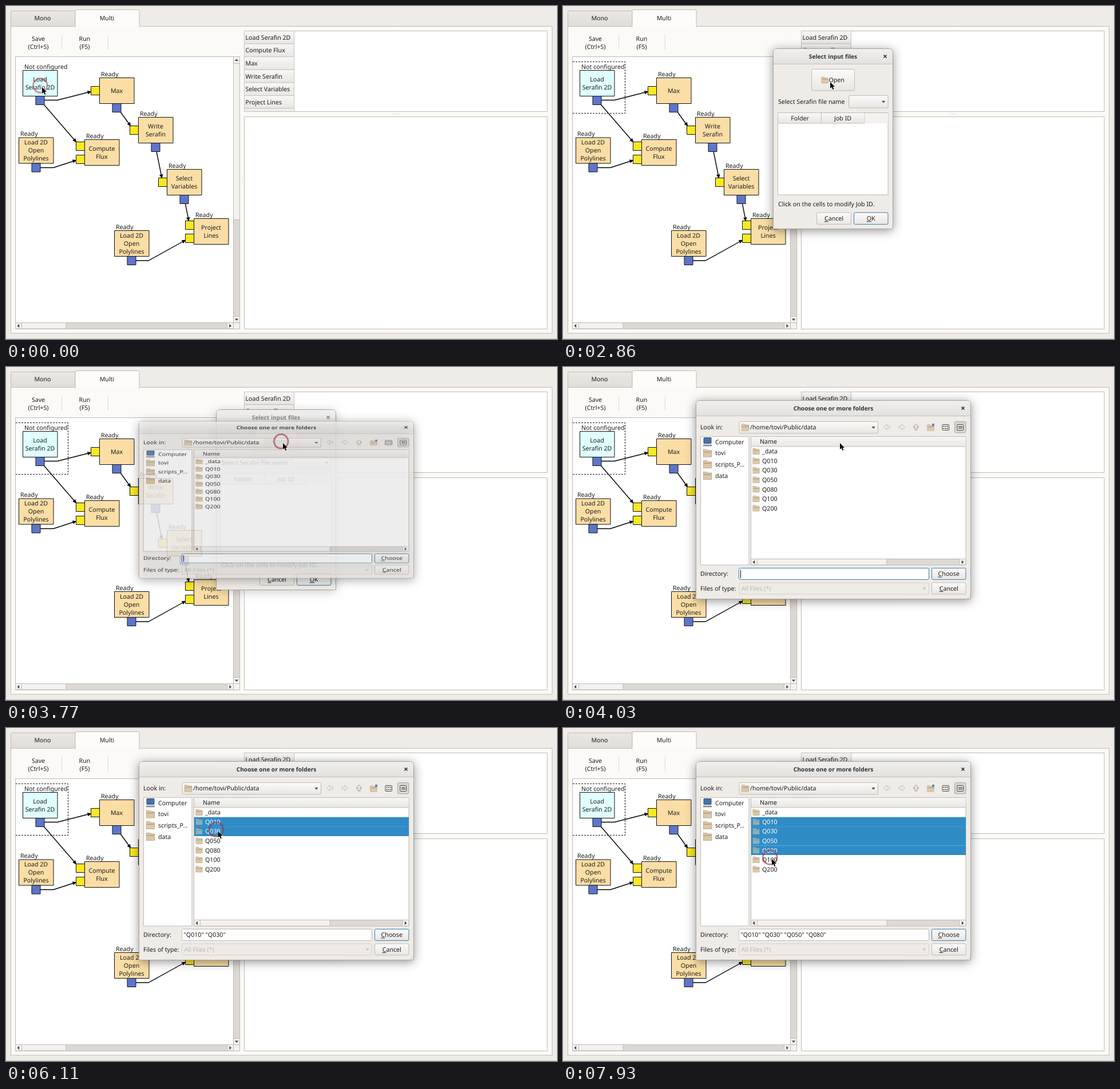
Write an HTML page with a canvas that moves like this. It is 963 px wide and 582 px high and loops after 8000 ms.

```html
<!DOCTYPE html>
<html lang="en">
<head>
<meta charset="utf-8">
<title>Workflow editor</title>
<style>
html, body { margin: 0; width: 100%; height: 100%; overflow: hidden; background: #efebe7; }
canvas { display: block; }
</style>
</head>
<body>
<canvas id="stage" width="963" height="582"></canvas>
<script>
const W = 963, H = 582, LOOP = 8000, STEP = 130;
const INK = '#1c1c1c', EDGE = '#bfbab5', BASE = '#efebe7', BLUE = '#308cc6';
const stage = document.getElementById('stage').getContext('2d');
const layer = Object.assign(document.createElement('canvas'), { width: W, height: H }).getContext('2d');
let c = stage;

// ---- drawing helpers ----
function fade(y, h, top, bottom) {
  const g = c.createLinearGradient(0, y, 0, y + h);
  g.addColorStop(0, top);
  g.addColorStop(1, bottom);
  return g;
}
function box(x, y, w, h, fill, stroke, radius = 0) {
  c.beginPath();
  c.roundRect(x, y, w, h, radius);
  if (fill) { c.fillStyle = fill; c.fill(); }
  if (stroke) { c.strokeStyle = stroke; c.lineWidth = 1; c.stroke(); }
}
function line(points, color = EDGE, width = 1) {
  c.beginPath();
  points.forEach(([x, y]) => c.lineTo(x, y));
  c.strokeStyle = color;
  c.lineWidth = width;
  c.stroke();
}
function shape(d, x, y, fill, stroke, angle = 0, width = 1) {
  const p = new Path2D(d);
  c.save();
  c.translate(x, y);
  c.rotate(angle);
  if (stroke) { c.strokeStyle = stroke; c.lineWidth = width; c.stroke(p); }
  if (fill) { c.fillStyle = fill; c.fill(p); }
  c.restore();
}
// y is the middle of the capitals
function text(s, x, y, align = 'left', color = INK, font = '10.65px') {
  c.font = font + ' "Noto Sans", sans-serif';
  c.textRendering = 'geometricPrecision';
  c.textAlign = align;
  c.fillStyle = color;
  c.fillText(s, x, y + 3.8);
}
const triangle = (x, y, angle = 0, color = '#444') => shape('M-3.2-1.6H3.2L0 2Z', x, y, color, null, angle);
const panel = (x, y, w, h) => box(x, y, w, h, '#fff', EDGE);

function button(label, x, y, w, h, primary) {
  box(x, y, w, h, fade(y, h, '#fcfbfa', '#e9e6e2'), primary ? '#3c7fb1' : EDGE, 2);
  const cx = x + w / 2, cy = y + h / 2;
  text(label, cx, cy, 'center');
  const left = cx - c.measureText(label).width / 2;
  line([[left, cy + 5.5], [left + c.measureText(label[0]).width, cy + 5.5]], INK);
}
function combo(x, y, w, h, off) {
  box(x, y, w, h, off ? '#eeebe7' : fade(y, h, '#fcfbfa', '#e9e6e2'), off ? '#d5d1cc' : EDGE, 2);
  triangle(x + w - 8, y + h / 2, 0, off ? '#c4c0bb' : '#444');
}
function folder(x, y, selected, size = 1) {
  const [fill, edge] = selected ? ['#8db0b8', '#6f9cad'] : ['#dcc8a8', '#ab9676'];
  c.save();
  c.translate(x, y);
  c.scale(size, size);
  shape('M-5.5-5H-1L0-3.5H5.5V5H-5.5Z', 0, 0, fill, edge);
  line([[-5, -1.5], [5, -1.5]], edge);
  c.restore();
}
function hScroll(x, y, w, thumbEnd) {
  box(x, y, w, 10.5, '#f4f2ef', EDGE);
  box(thumbEnd, y + .5, x + w - 11 - thumbEnd, 9.5, '#dcd8d4');
  for (const sx of [x + 11, thumbEnd, x + w - 11]) line([[sx, y], [sx, y + 10]]);
  triangle(x + 5, y + 5.5, Math.PI / 2);
  triangle(x + w - 5.5, y + 5.5, -Math.PI / 2);
}

// ---- main window ----
const nodes = [
  // x, y, inputs, has output, lines
  [29.5, 112.5, 0, 1, 'Load|Serafin 2D'],
  [163.5, 125.5, 1, 1, 'Max'],
  [231.5, 194.5, 1, 1, 'Write|Serafin'],
  [281.5, 285.5, 1, 1, 'Select|Variables'],
  [137.5, 233.5, 2, 0, 'Compute|Flux'],
  [328.5, 371.5, 2, 0, 'Project|Lines'],
  [22.5, 230, 0, 1, 'Load 2D|Open|Polylines'],
  [189.5, 392.5, 0, 1, 'Load 2D|Open|Polylines']
];
const links = [
  [[67, 164.5], [90, 164.5], [149, 149.5]],
  [[66, 172], [123, 238]],
  [[60, 282.5], [83, 282.5], [123, 269.5]],
  [[200, 185], [218, 210]],
  [[263, 254], [272.5, 301]],
  [[313.5, 346], [319.5, 376]],
  [[227, 445], [249, 445], [314, 409]]
];

function drawNode([x, y, inputs, output, label], i) {
  box(x, y, 60.5, 45, i ? '#fbdea5' : '#e0ffff', '#111');
  const rows = label.split('|');
  rows.forEach((s, k) => text(s, x + 30, y + 22.5 + (k - (rows.length - 1) / 2) * 14, 'center'));
  const ports = inputs === 2 ? [4, 27] : inputs ? [15] : [];
  ports.forEach(dy => box(x - 15, y + dy, 15, 15, '#fbe822', '#111'));
  if (output) box(x + 22.5, y + 45, 15, 15, '#5d76ca', '#111');
  text(i ? 'Ready' : 'Not configured', x + 2.5, y - 6.5);
}
function drawLink(points) {
  line(points, '#000', 1.4);
  const [[x0, y0], [x1, y1]] = points.slice(-2);
  shape('M0.5 0L-6.5-3.2V3.2Z', x1, y1, '#000', null, Math.atan2(y1 - y0, x1 - x0));
}
function drawMain(selected) {
  box(0, 0, W, H, BASE);
  line([[0, 581.5], [W, 581.5]], '#c9c5c0');
  box(8.5, 8.5, 112.5, 30, fade(8, 27, '#ebe8e4', '#e1deda'), EDGE, 2);
  box(8.5, 35.5, 946, 536.5, '#fcfaf7', EDGE);
  box(121, 6.5, 112, 32, '#fdfcfa', EDGE, 2);
  box(121.5, 34, 111, 6, '#fcfaf7');
  text('Mono', 64, 21.5, 'center');
  text('Multi', 176.5, 21, 'center');
  text('Save', 56.5, 57, 'center');
  text('(Ctrl+S)', 56.5, 71, 'center');
  text('Run', 137.5, 57, 'center');
  text('(F5)', 137.5, 71, 'center');
  for (const x of [97.5, 178.5]) line([[x, 50], [x, 76]], '#dcd9d5');

  panel(16.5, 88.5, 392, 476);
  box(397.5, 88.5, 11, 476, '#f4f2ef', EDGE);
  box(398, 373, 10, 170, '#dcd8d4');
  for (const y of [100.5, 373.5, 542.5, 553.5]) line([[398, y], [408, y]]);
  triangle(403, 94.5, Math.PI);
  triangle(403, 548);
  hScroll(16.5, 553.5, 381, 105);

  links.forEach(drawLink);
  nodes.forEach(drawNode);
  if (selected) {
    c.setLineDash([3, 2]);
    line([[17, 97.5], [108.5, 97.5], [108.5, 187.5], [17, 187.5]], '#111');
    c.setLineDash([]);
  }

  panel(416.5, 43.5, 529.5, 141);
  ['Load Serafin 2D', 'Compute Flux', 'Max', 'Write Serafin', 'Select Variables', 'Project Lines', ''].forEach((s, i) => {
    const y = 43.5 + i * 22.6, h = Math.min(22.6, 184.5 - y);
    box(416.5, y, 87, h, fade(y, h, '#f8f7f5', '#e9e6e3'), '#c6c2bd');
    text(s, 418.5, y + 11.5);
  });
  panel(416.5, 193.5, 529.5, 371);
  for (let i = -2; i <= 2; i++) {
    box(681 + i * 2.5, 188, 1, 1, '#c8c4bf');
    box(412.5, 306 + i * 2.5, 1, 1, '#c8c4bf');
  }
}

// ---- dialogs ----
function frame(x, y, w, h, title, active) {
  box(x + .5, y + .5, w - 1, h - 1, BASE, '#a7a29c', [6, 6, 1, 1]);
  box(x + 1, y + 1, w - 2, 27, active ? fade(y, 28, '#f1f0ee', '#e3e1de') : '#efeeec', null, [5, 5, 0, 0]);
  line([[x + 1, y + 27.5], [x + w - 1, y + 27.5]], '#c2beb9');
  const color = active ? '#2e3436' : '#8b8b89';
  text(title, x + w / 2, y + 14, 'center', color, 'bold 10.2px');
  shape('M-2.5-2.5L2.5 2.5M2.5-2.5L-2.5 2.5', x + w - 14, y + 14, null, color, 0, 1.7);
}
function drawInput(active) {
  frame(367, 74, 210, 316, 'Select input files', active);
  box(434.5, 110.5, 75, 37.5, fade(110, 38, '#fcfbfa', '#e9e6e2'), EDGE, 2);
  folder(457.5, 129.5);
  text('Open', 464.5, 129.5);
  text('Select Serafin file name', 376, 167.5);
  combo(499.5, 156.5, 68.5, 21.5);
  panel(375.5, 186.5, 192.5, 143.5);
  box(376, 187, 192, 18, '#f4f2ef');
  box(376, 187, 151, 18, fade(187, 18, '#f8f7f5', '#e9e6e3'));
  line([[376, 205], [527, 205]]);
  line([[451.5, 187], [451.5, 205]]);
  line([[527, 187], [527, 205]], '#d5d1cc');
  text('Folder', 414, 196, 'center');
  text('Job ID', 489, 196, 'center');
  text('Click on the cells to modify Job ID.', 376, 346);
  button('Cancel', 443.5, 361, 60, 20.5);
  button('OK', 508.5, 361, 59.5, 20.5, true);
}

const folders = ['_data', 'Q010', 'Q030', 'Q050', 'Q080', 'Q100', 'Q200'];
const picks = [5200, 6110, 6760, 7410];
const NAV = 'M-5.5 0L0-5V-2H5V2H0V5Z';

function drawChooser(t) {
  const count = picks.filter(p => t >= p).length;
  frame(232, 58, 481, 348, 'Choose one or more folders', true);
  text('Look in:', 240, 105.5);
  combo(308, 95.5, 242.5, 20.5);
  folder(318.5, 105.5, false, 1.1);
  text('/home/tovi/Public/data', 327, 105.5);
  shape(NAV, 566, 105, null, '#c3bfba');
  shape(NAV, 592, 105, null, '#c3bfba', Math.PI);
  shape(NAV, 617, 105, null, '#98938d', Math.PI / 2);
  folder(642.5, 106);
  box(645, 99, 4, 4, '#4f86bd');
  box(663, 100.5, 11.5, 10, '#fff', '#444', 1);
  for (let i = 0; i < 6; i++) box(664.7 + i % 3 * 3.2, 102.5 + (i / 3 | 0) * 4, 2, 2, '#444');
  box(684.5, 95.5, 19.5, 19.5, '#d9d5d0', '#aaa59f', 2);
  box(689, 100.5, 10.5, 10, '#fff', '#333', 1);
  for (const y of [103.5, 105.5, 107.5]) line([[691, y], [698, y]], '#333');

  panel(240.5, 121.5, 84.5, 224.5);
  ['Computer', 'tovi', 'scripts_P...', 'data'].forEach((s, i) => {
    const y = 131 + i * 19.6;
    if (i) folder(252.5, y, false, 1.25);
    else {
      box(246, y - 7.5, 13, 10, '#4673ae', '#3b4a5c', 1);
      box(245, y + 4.5, 15, 3, '#8b929b');
    }
    text(s, 266, y);
  });

  panel(328.5, 121.5, 375.5, 224.5);
  box(329, 122, 374.5, 17, fade(122, 17, '#f8f7f5', '#e9e6e3'));
  line([[329, 139], [704, 139]]);
  text('Name', 344, 130.5);
  folders.forEach((s, i) => {
    const y = 147.5 + i * 16.55, on = i > 0 && i <= count;
    if (on) box(329, y - 8.3, 375, 16.7, BLUE);
    folder(337.5, y, on);
    text(s, 348, y, 'left', on ? '#fff' : INK);
  });
  hScroll(328.5, 335.5, 375.5, 566);

  text('Directory:', 240, 361.5);
  box(307.5, 351.5, 332, 20, '#fff', count ? EDGE : '#3c7fb1', 2);
  const names = folders.slice(1, count + 1);
  text(count > 1 ? names.map(s => `"${s}"`).join(' ') : names.join(''), 310.5, 361.5);
  if (!count && (t - 3640) % 1040 < 520) line([[310.5, 355], [310.5, 369]], '#000');
  button('Choose', 644.5, 351.5, 59.5, 20, true);
  text('Files of type:', 240, 387);
  combo(307.5, 377, 332, 20, true);
  text('All Files (*)', 311.5, 387, 'left', '#bcb8b3');
  button('Cancel', 644.5, 377, 59.5, 20);
  for (let row = 0; row < 3; row++)
    for (let k = 0; k <= row; k++) box(711 - k * 2.5, 398.5 + row * 2.5, 1, 1, '#bdb8b2');
}

// Opens a window from its horizontal middle line, growing and fading in together.
function openWindow(x, y, w, h, age, shade, draw) {
  if (age <= 0) return;
  const p = 1 - (1 - Math.min(1, age / 240)) ** 2;
  c = layer;
  c.clearRect(0, 0, W, H);
  draw();
  c = stage;
  c.save();
  c.globalAlpha = p;
  c.translate(0, y + h / 2);
  c.scale(1, p);
  c.translate(0, -y - h / 2);
  c.save();
  c.shadowColor = `rgba(0,0,0,${shade})`;
  c.shadowBlur = 17;
  c.shadowOffsetX = 2000;
  c.shadowOffsetY = 3;
  box(x - 2000, y, w, h, '#000', null, 6);
  c.restore();
  c.drawImage(layer.canvas, 0, 0);
  c.restore();
}

// ---- pointer ----
const track = [
  [0, 63, 142], [780, 63, 142], [1430, 174, 133], [2340, 395, 133], [2600, 431, 125],
  [2860, 467, 133], [3250, 484, 133], [4160, 484, 133], [4940, 371, 161], [5200, 370, 163],
  [5590, 370, 163], [6110, 370.5, 180.5], [6370, 370.5, 180.5], [6760, 370, 198],
  [7020, 370, 198], [7410, 368, 209], [7800, 367, 209], [7930, 365, 229], [8000, 365, 229]
];
const clicks = [[0, 260], [3380, 3900], [5330, 5590], [6110, 6370], [6760, 7150], [7410, 7670], [7930, 8000]];

function drawPointer(t) {
  const i = track.findIndex(k => k[0] > t);
  const [t0, x0, y0] = track[i - 1], [t1, x1, y1] = track[i];
  const k = (t - t0) / (t1 - t0), x = x0 + (x1 - x0) * k, y = y0 + (y1 - y0) * k;
  if (clicks.some(([on, off]) => t >= on && t < off)) {
    c.beginPath();
    c.arc(x - 3.2, y - 3, 12.3, 0, 7);
    c.strokeStyle = `rgba(160,45,60,${t < 260 ? .5 : .6})`;
    c.lineWidth = 2.8;
    c.stroke();
  }
  shape('M0 0V11L2.6 8.8L4.5 13L6.4 12.2L4.6 8.1H8Z', x, y, '#000', 'rgba(255,255,255,.8)', 0, 1.2);
}

function draw() {
  const t = Math.floor(performance.now() % LOOP / STEP) * STEP;
  const choosing = t >= 3640;
  drawMain(t >= 260);
  openWindow(367, 74, 210, 316, t - 520, choosing ? .2 : .42, () => drawInput(!choosing));
  openWindow(232, 58, 481, 348, t - 3640, .42, () => drawChooser(t));
  drawPointer(t);
  requestAnimationFrame(draw);
}
draw();
</script>
</body>
</html>
```
